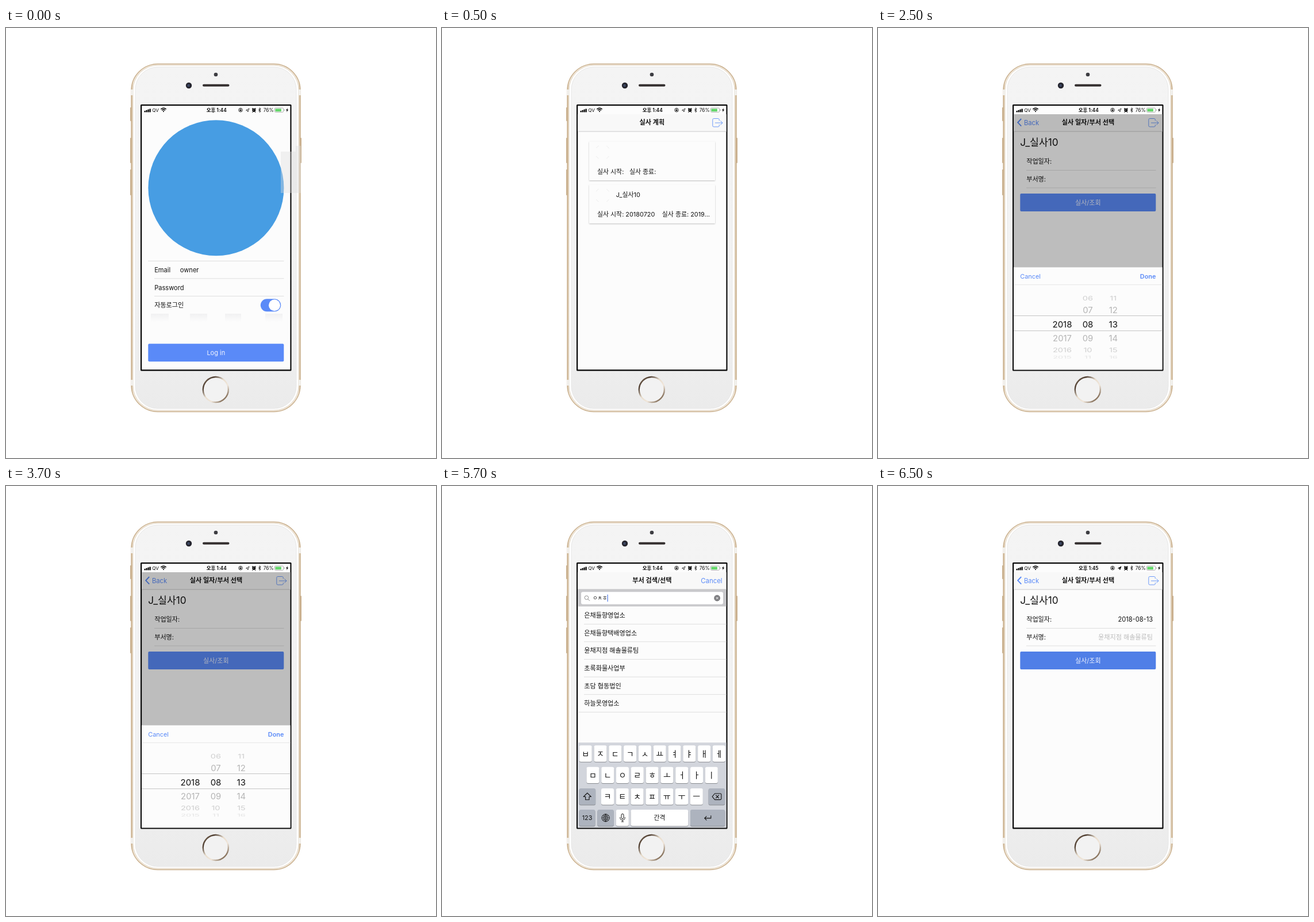
Write an HTML page that moves like this. It is 748x748 px and loops after 8 s.

```html
<!DOCTYPE html>
<html lang="ko">
<head>
<meta charset="utf-8">
<title>Phone app walkthrough</title>
<style>
html, body { margin: 0; width: 100%; height: 100%; overflow: hidden; background: #fff; }
svg { display: block; width: 100%; height: 100%; }
text { font-family: Inter, "Noto Sans CJK KR", "Noto Sans CJK", sans-serif; white-space: pre; }
</style>
</head>
<body>
<svg id="stage" viewBox="0 0 748 748">
  <defs>
    <linearGradient id="body" x1="0" y1="0" x2="0" y2="1">
      <stop offset="0" stop-color="#f4f4f4"/>
      <stop offset=".6" stop-color="#f2f2f2"/>
      <stop offset="1" stop-color="#ebebeb"/>
    </linearGradient>
    <linearGradient id="rim" x1="0" y1="0" x2="1" y2="0">
      <stop offset="0" stop-color="#cdb491"/>
      <stop offset=".012" stop-color="#efe4d5"/>
      <stop offset=".988" stop-color="#efe4d5"/>
      <stop offset="1" stop-color="#cdb491"/>
    </linearGradient>
    <linearGradient id="ring" x1="0" y1="0" x2="1" y2="1">
      <stop offset="0" stop-color="#8d7a66"/>
      <stop offset=".22" stop-color="#4c3b2e"/>
      <stop offset=".45" stop-color="#e9ddcd"/>
      <stop offset=".65" stop-color="#f0e6da"/>
      <stop offset=".85" stop-color="#8a7560"/>
      <stop offset="1" stop-color="#c9b499"/>
    </linearGradient>
    <linearGradient id="fade" x1="0" y1="0" x2="0" y2="1">
      <stop offset="0" stop-color="#f1f1f2"/>
      <stop offset="1" stop-color="#fcfcfc"/>
    </linearGradient>
    <filter id="lift" x="-10%" y="-10%" width="120%" height="130%">
      <feDropShadow dx="0" dy="1" stdDeviation=".9" flood-opacity=".26"/>
    </filter>
    <clipPath id="glass"><rect x="236" y="135" width="258.5" height="459.5"/></clipPath>
  </defs>
  <g id="phone"></g>
  <g id="screens" clip-path="url(#glass)"></g>
  <g id="status"></g>
</svg>
<script>
const BLUE = '#5a8af8', INK = '#111', LINE = '#dedede', PAPER = '#fcfcfc';
const LOOP = 8000;
const $ = id => document.getElementById(id);

// Markup helpers; text is placed by its vertical middle.
const attrs = o => Object.entries(o).map(([k, v]) => ` ${k}="${v}"`).join('');
const rect = (x, y, w, h, fill, o = {}) =>
  `<rect x="${x}" y="${y}" width="${w}" height="${h}" fill="${fill}"${attrs(o)}/>`;
const circle = (x, y, r, fill, o = {}) =>
  `<circle cx="${x}" cy="${y}" r="${r}" fill="${fill}"${attrs(o)}/>`;
const path = (d, stroke, width = 1, o = {}) =>
  `<path d="${d}" fill="none" stroke="${stroke}" stroke-width="${width}"${attrs(o)}/>`;
const line = (x1, x2, y, color = LINE) => path(`M${x1} ${y}H${x2}`, color);
const text = (x, y, s, size = 11.1, fill = INK, o = {}) =>
  `<text x="${x}" y="${y + size * 0.37}" font-size="${size}" fill="${fill}"${attrs(o)}>${s}</text>`;
const MID = { 'text-anchor': 'middle' }, END = { 'text-anchor': 'end' };
const ROUND = { 'stroke-linecap': 'round', 'stroke-linejoin': 'round' };

function drawPhone() {
  const gold = '#c9b08e';
  return [
    ...[[216, 138, 24], [216, 191, 44], [216, 246, 45], [511, 191, 44]]
      .map(([x, y, h]) => rect(x, y, 3, h, gold, { rx: 1 })),
    rect(218, 62.5, 294, 605, 'url(#rim)', { rx: 46, stroke: gold, 'stroke-width': 1.4 }),
    ...[107, 612].map(y => rect(217.3, y, 4, 10, '#f4f4f2') + rect(508.7, y, 4, 10, '#f4f4f2')),
    rect(221, 65, 288, 600, '#fff', { rx: 43, stroke: '#e0d7ca', 'stroke-width': .8 }),
    rect(225, 68, 280, 594, 'url(#body)', { rx: 39, stroke: '#e7e7e7', 'stroke-width': 1 }),
    circle(365, 81, 3.3, '#3d3d42'),
    circle(318, 100, 5.2, '#25252e') + circle(317.5, 100, 2.2, '#3c4864'),
    rect(342, 97.8, 46.5, 4, '#353030', { rx: 2 }),
    circle(364.8, 629, 22, '#f2f2f2', { stroke: 'url(#ring)', 'stroke-width': 2.4 }),
    rect(234, 133, 262.5, 463.5, '#050505', { rx: 1.5 }),
    rect(236.2, 135.2, 258.2, 459, PAPER)
  ].join('');
}

function drawStatus() {
  const bars = [0, 1, 2, 3].map(i =>
    rect(240.5 + i * 3, 144 - i * 1.2, 2.2, 2.5 + i * 1.2, '#000', { rx: .5 })).join('');
  const wifi = path('M269.3 141.2q4.7-4 9.4 0M271 143.2q3-2.6 6 0', '#000', 1.5) +
    '<path d="M272.6 144.6q1.4-1 2.8 0l-1.4 1.8z"/>';
  const lock = circle(408, 142.7, 3.3, 'none', { stroke: '#000', 'stroke-width': .8 }) +
    rect(406.5, 142.2, 3, 2.2, '#000') + path('M407 142.5v-1a1 1 0 0 1 2 0v1', '#000', .6);
  const alarm = circle(431.3, 143, 2.9, '#000') +
    path('M428.2 140.8l1.6-1.3M434.4 140.8l-1.6-1.3M429.3 146l-.8.8M433.3 146l.8.8', '#000', 1.2) +
    path('M431.3 141.2v2h-1.3', '#fff', .6);
  const battery = rect(467.3, 139.2, 15.4, 7.2, '#fff', { rx: 1.8, stroke: '#9c9c9c', 'stroke-width': .8 }) +
    rect(468.5, 140.4, 10.4, 4.8, '#62d668', { rx: .8 }) + rect(483.6, 141.6, 1, 2.4, '#9c9c9c');
  return bars + text(254.2, 142.8, 'QV', 8.2) + wifi +
    `<text id="clock" x="366.3" y="146" font-size="8.4" font-weight="600" text-anchor="middle"></text>` +
    lock + `<path id="arrow" d="M417.5 143.1l5.6-3.1-2.4 6-.5-2.7z" stroke="#000" stroke-width=".7"/>` +
    alarm + path('M439.2 141l4 3.6-2 1.9v-7.6l2 1.9-4 3.6', '#000', .8) +
    text(447.8, 142.8, '76%', 8.3) + battery + '<path d="M490 139l-3 4.3h1.8l-.7 3.2 3-4.4h-1.8z"/>';
}

const logout = () => path('M482.3 161v-1.4q0-2.1-2.1-2.1h-7.4q-2 0-2 2v10.4q0 2 2 2h7.4q2.1 0 2.1-2.1v-1.4' +
  'M475.3 165H488M484.6 161.6L488 165l-3.4 3.4', '#6d9af8', 1, ROUND);

const nav = title => rect(236, 150, 259, 30, '#f8f8f8') + line(236, 495, 180, '#c9c9cb') +
  text(365.4, 164.3, title, 11.1, INK, { ...MID, 'font-weight': 600 });

const button = (y, label, fill = BLUE) => rect(247.3, y, 236, 31, fill, { rx: 2 }) +
  text(365.3, y + 15.7, label, 11, '#f2f5ff', MID);

function login() {
  const ghosts = [[252, 31], [320, 30], [381, 28], [451, 30]]
    .map(([x, w]) => rect(x, 497, w, 14, 'url(#fade)')).join('');
  return circle(365.4, 278.2, 118, '#479de3') +
    line(247, 483.5, 405.3) + text(258.2, 421, 'Email') + text(302.8, 421, 'owner') +
    line(258, 483.5, 435.8) + text(258.2, 451.6, 'Password') +
    line(258, 483.5, 466.4) + text(258.2, 482, '자동로그인') +
    rect(442.8, 471.2, 35.4, 22, BLUE, { rx: 11 }) + circle(467, 482.2, 10, '#fff') +
    ghosts + button(549.3, 'Log in');
}

function card(y, h, name, from, to, toX) {
  return rect(256, y, 219, h, PAPER, { rx: 1, filter: 'url(#lift)' }) +
    circle(279.3, y + 18.5, 13, 'none', { stroke: '#e9e9e9', 'stroke-width': .8, 'stroke-dasharray': '6 14.42', 'stroke-dashoffset': -7 }) +
    text(302.8, y + 17.3, name, 10.9) +
    text(270, y + h - 15.5, '실사 시작: ' + from, 10.9) + text(toX, y + h - 15.5, '실사 종료: ' + to, 10.9);
}

const plans = () => nav('실사 계획') + logout() +
  card(197.5, 67.5, '', '', '', 326) + card(272.7, 67, 'J_실사10', '20180720', '2019...', 382.8);

const choice = (date, dept, fill) => nav('실사 일자/부서 선택') + logout() +
  path('M249.2 158l-6 6.3 6 6.3', BLUE, 1.9) + text(254, 164.5, 'Back', 11.2, BLUE) +
  text(247.3, 199, 'J_실사10', 17.2) +
  text(258.2, 232, '작업일자:') + text(478, 232.2, date, 11.1, INK, END) + line(258, 483.5, 247.5) +
  text(258.2, 262.8, '부서명:') + text(478, 262.8, dept, 11.1, '#bcbcbc', END) + line(258, 483.5, 278) +
  button(288, '실사/조회', fill);

// Picker rows flatten and fade with distance from the chosen row.
function wheel(x, first, count, start) {
  const shift = [0, 24.3, 45, 58], squash = [1, .93, .72, .38];
  const tone = ['#111', '#b4b4b4', '#cfcfcf', '#e4e4e4'];
  return Array.from({ length: count }, (_, i) => {
    const row = start + i, far = Math.abs(row);
    const label = String(x < 330 ? first - i : first + i).padStart(2, '0');
    return `<g transform="translate(${x} ${515.3 + Math.sign(row) * shift[far]}) scale(${1 - far * .012} ${squash[far]})">` +
      text(0, 0, label, 15, tone[far], MID) + '</g>';
  }).join('');
}

const picker = () => choice('', '', BLUE) + rect(236, 150, 259, 267, '#000', { opacity: .25 }) +
  rect(236, 416.3, 259, 179, PAPER) + line(236, 495, 446.6, '#e6e6e6') +
  text(247.3, 432, 'Cancel', 10.9, BLUE) + text(483.4, 432, 'Done', 10.9, BLUE, { ...END, 'font-weight': 600 }) +
  line(236, 495, 500.5, '#c4c4c4') + line(236, 495, 526.7, '#c4c4c4') +
  wheel(320.5, 2018, 4, 0) + wheel(365, 6, 6, -2) + wheel(409.3, 11, 6, -2);

function keyboard() {
  const key = (x, y, w, label = '', fill = '#fff', size = 14) =>
    rect(x, y + 1, w, 28.4, '#898c91', { rx: 3 }) + rect(x, y, w, 28.4, fill, { rx: 3 }) +
    text(x + w / 2, y + 14.3, label, size, INK, MID);
  const row = (letters, x, y) => [...letters].map((c, i) => key(x + i * 25.8, y, 22, c)).join('');
  const grey = '#adb3be';
  const globe = circle(284.6, 577.3, 6.6, 'none', { stroke: INK, 'stroke-width': .9 }) +
    path('M278 577.3h13.2M284.6 570.7v13.2M279.4 573.6q5.2 2.6 10.4 0M279.4 581q5.2-2.6 10.4 0' +
      'M284.6 570.7q-6.4 6.6 0 13.2M284.6 570.7q6.4 6.6 0 13.2', INK, .8);
  const mic = rect(312, 570.3, 4, 8.4, 'none', { rx: 2, stroke: INK, 'stroke-width': 1 }) +
    path('M309.8 576v1.2q0 3.8 4.2 3.8t4.2-3.8V576M314 581v3M311.8 584h4.4', INK, .9);
  return rect(236, 446.3, 259, 149, '#d2d5dc') +
    row('ㅂㅈㄷㄱㅅㅛㅕㅑㅐㅔ', 238.7, 451.3) + row('ㅁㄴㅇㄹㅎㅗㅓㅏㅣ', 251.4, 488.7) +
    key(238.5, 526, 28.7, '', grey) + row('ㅋㅌㅊㅍㅠㅜㅡ', 277, 526) + key(463.5, 526, 28.7, '', grey) +
    path('M252.8 534l-6.6 6.5h3.4v5.3h6.4v-5.3h3.4z', INK, 1.1, ROUND) +
    path('M474.5 535h9.7q1.6 0 1.6 1.6v7.4q0 1.6-1.6 1.6h-9.7l-4.4-5.3zM476.5 537.8l5 5m0-5l-5 5', INK, 1.1, ROUND) +
    key(238.5, 563, 28, '123', grey, 10.8) + key(270.3, 563, 28.5, '', grey) + globe +
    key(302.8, 563, 22, '') + mic + key(328.6, 563, 99.6, '간격', '#fff', 10.8) +
    key(432, 563, 60.3, '', grey) +
    path('M467.8 573.6v4.3h-11M460 574.6l-3.3 3.3 3.3 3.3', INK, 1.1, ROUND);
}

function search() {
  const depts = ['은채들향영업소', '은채들향택배영업소', '윤채지점 해솔물류팀', '초록화물사업부', '초담 협동법인', '하늘못영업소'];
  const rows = depts.map((d, i) => text(247.3, 225 + i * 30.6, d) +
    line(i < 5 ? 247 : 236, 495, 240.3 + i * 30.6)).join('');
  return nav('부서 검색/선택') + text(487.6, 164.6, 'Cancel', 11.4, BLUE, END) +
    rect(236, 179.5, 259, 30, '#c9c9cc') + rect(242, 184.2, 247, 21.6, '#fff', { rx: 3 }) +
    circle(251.4, 194.2, 3.3, 'none', { stroke: '#777', 'stroke-width': .8 }) + path('M253.8 196.6l3.2 3.2', '#777', .9) +
    text(262.2, 195, 'ㅇㅊㅎ', 9.1) + rect(287.5, 188.8, 1.2, 12.4, '#4d79e8') +
    circle(478.6, 195, 5.4, '#7d7d80') + path('M476.5 192.9l4.2 4.2m0-4.2l-4.2 4.2', '#fff', 1) +
    rows + keyboard();
}

const scenes = [
  { at: 0, draw: login },
  { at: 500, draw: plans },
  { at: 2500, draw: picker },
  { at: 4500, draw: search },
  { at: 6500, draw: () => choice('2018-08-13', '윤채지점 해솔물류팀', '#507fe7') }
];

$('phone').innerHTML = drawPhone();
$('screens').innerHTML = scenes.map(s => `<g>${s.draw()}</g>`).join('');
$('status').innerHTML = drawStatus() + '<g id="haze">' +
  rect(478, 215, 26, 72, '#dcdcdc', { opacity: .4 }) + rect(504, 205, 9, 82, '#dcdcdc', { opacity: .4 }) + '</g>';
const views = [...$('screens').children];

function render(ms) {
  const t = ms % LOOP;
  const now = scenes.filter(s => s.at <= t).length - 1;
  const last = now === scenes.length - 1;
  views.forEach((v, i) => v.setAttribute('display', i === now ? 'inline' : 'none'));
  $('haze').setAttribute('display', now === 0 ? 'inline' : 'none');
  $('clock').textContent = last ? '오후 1:45' : '오후 1:44';
  $('arrow').setAttribute('fill', last ? '#000' : 'none');
}

function tick() {
  render(performance.now());
  requestAnimationFrame(tick);
}
tick();
</script>
</body>
</html>
```
